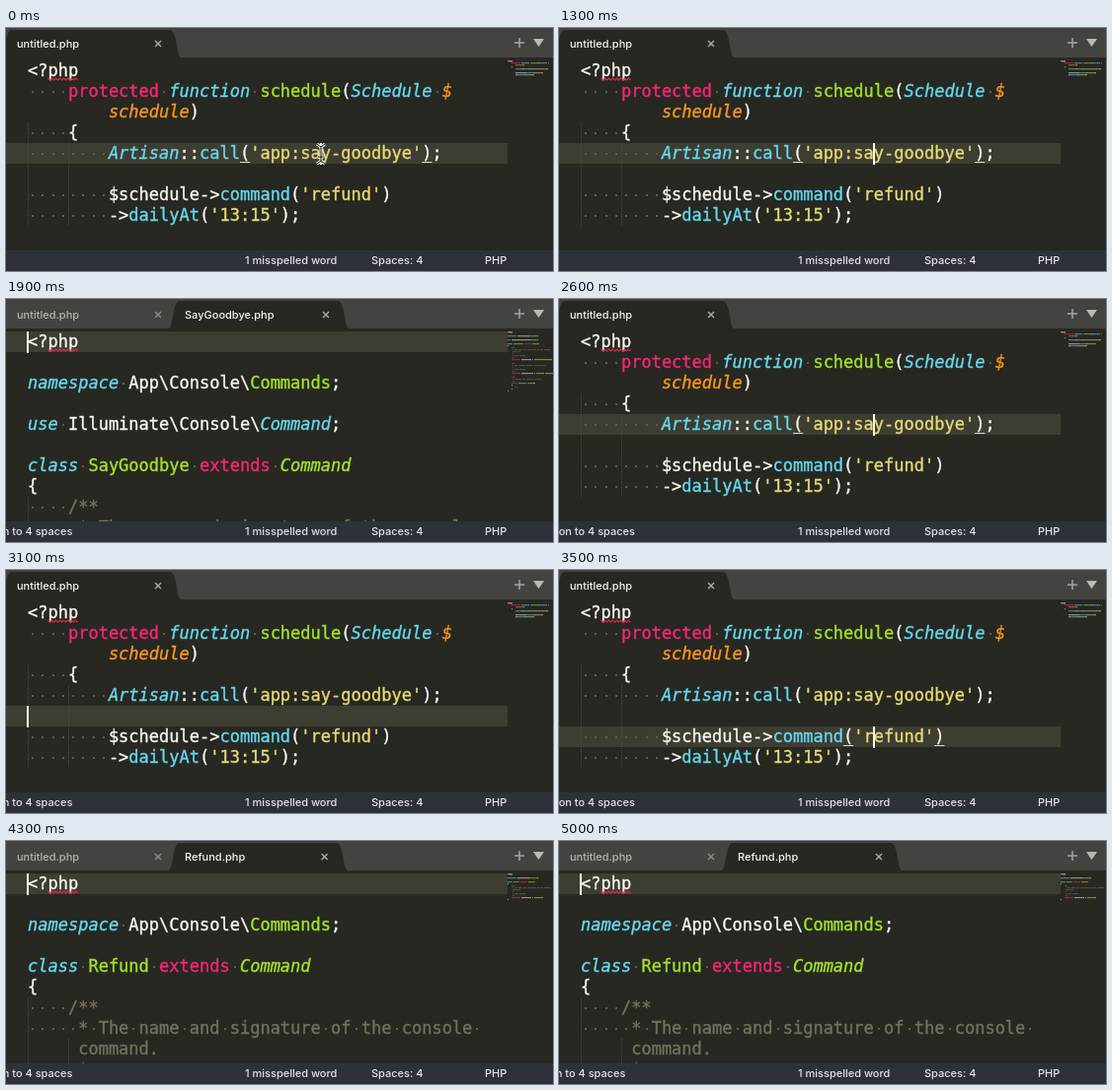
Write an HTML page with a canvas that moves like this. It is 554 px wide and 247 px high and loops after 5.1 s.

```html
<!DOCTYPE html>
<html lang="en">
<head>
<meta charset="utf-8">
<title>Editor: jump to command class</title>
<style>
html, body { margin: 0; width: 100%; height: 100%; overflow: hidden; background: #272822; }
canvas { display: block; width: 554px; height: 247px; }
</style>
</head>
<body>
<canvas id="stage" width="554" height="247"></canvas>
<script>
const ctx = document.getElementById('stage').getContext('2d');
const LOOP = 5100, STEP = 100;
const LEFT = 22, TOP = 33, ROW = 21, SIZE = 17, STATUS_Y = 226, MAP_X = 508;
const MONO = '"DejaVu Sans Mono", monospace', UI = 'Inter, sans-serif';
const BG = '#272822', LINE = '#3e3d32';
const COLORS = { w: '#f8f8f2', p: '#f92672', c: '#66d9ef', g: '#a6e22e', o: '#fd971f', y: '#e6db74', k: '#75715e' };

// Each row is split by "|"; a segment starts with its colour key, upper case meaning italic.
// "_" marks the blank indent of a wrapped row.
const parse = row => row ? row.split('|').map(s => ({ key: s[0], text: s.slice(1) })) : [];

const header = ['w<?php', '', 'Cnamespace|w App\\Console\\|gCommands|w;', ''];
const docTop = ['k    /**', 'k     * The name and signature of the console ', '_     |kcommand.',
  'k     *', 'k     * @var string', 'k     */'];

const files = {
  untitled: {
    rows: [
      'w<?php',
      'w    |pprotected|w |Cfunction|w |gschedule|w(|CSchedule|w |O$',
      '_        |Oschedule|w)',
      'w    {',
      'w        |CArtisan|w::|ccall|w(|y\'app:say-goodbye\'|w);',
      '',
      'w        $schedule->|ccommand|w(|y\'refund\'|w)',
      'w        ->|cdailyAt|w(|y\'13:15\'|w);'
    ],
    guides: [[0, 3, 8], [4, 4, 8]]
  },
  goodbye: {
    label: 'SayGoodbye.php',
    rows: [...header, 'Cuse|w Illuminate\\Console\\|CCommand|w;', '',
      'Cclass|w |gSayGoodbye|w |pextends|w |GCommand', 'w{', ...docTop,
      'w    |pprotected|w $signature = |y\'app:say-goodbye\'|w;', '',
      'k    /**', 'k     * The console command description.', 'k     *', 'k     * @var string', 'k     */',
      'w    |pprotected|w $description = |y\'Command description\'|w;', '',
      'k    /**', 'k     * Execute the console command.', 'k     */',
      'w    |ppublic|w |Cfunction|w |ghandle|w()', 'w    {', 'k        //', 'w    }', 'w}'],
    guides: [[0, 8, 10]]
  },
  refund: {
    label: 'Refund.php',
    rows: [...header, 'Cclass|w |gRefund|w |pextends|w |GCommand', 'w{', ...docTop,
      'w    |pprotected|w $signature = |y\'refund\'|w;', 'w}'],
    guides: [[0, 6, 10], [4, 8, 10]]
  }
};
for (const file of Object.values(files)) file.rows = file.rows.map(parse);

// Caret stops: start time, file, row, column, matching bracket columns.
const stops = [
  { at: 0, file: 'untitled', row: 4, col: 29, brackets: [21, 39] },
  { at: 1600, file: 'goodbye', row: 0, col: 0 },
  { at: 2500, file: 'untitled', row: 4, col: 29, brackets: [21, 39] },
  { at: 3000, file: 'untitled', row: 5, col: 0 },
  { at: 3300, file: 'untitled', row: 6, col: 29, brackets: [26, 35] },
  { at: 4200, file: 'refund', row: 0, col: 0 }
];

ctx.font = `${SIZE}px ${MONO}`;
const CHAR = ctx.measureText('0').width;
const colX = col => LEFT + col * CHAR;
const rowY = row => TOP + row * ROW;
const clamp = v => Math.max(0, Math.min(1, v));
const ease = v => 1 - (1 - clamp(v)) ** 3;

function rect(x, y, w, h, color) {
  ctx.fillStyle = color;
  ctx.fillRect(x, y, w, h);
}

function path(points, color, width) {
  ctx.beginPath();
  points.forEach(([x, y], i) => i ? ctx.lineTo(x, y) : ctx.moveTo(x, y));
  ctx.strokeStyle = color;
  ctx.lineWidth = width;
  ctx.stroke();
}

function label(text, x, y, color, align = 'left') {
  ctx.font = `500 11px ${UI}`;
  ctx.textAlign = align;
  ctx.fillStyle = color;
  ctx.fillText(text, x, y);
  ctx.textAlign = 'left';
}

function drawRow(segments, row) {
  const base = rowY(row) + 16;
  let col = 0;
  for (const { key, text } of segments) {
    const italic = key !== key.toLowerCase();
    ctx.font = `${italic ? 'italic ' : ''}${SIZE}px ${MONO}`;
    const color = COLORS[key.toLowerCase()];
    if (color) {
      ctx.fillStyle = ctx.strokeStyle = color;
      ctx.lineWidth = 0.35;
      ctx.fillText(text, colX(col), base);
      ctx.strokeText(text, colX(col), base);
      [...text].forEach((c, i) => {
        if (c === ' ') rect(Math.round(colX(col + i + 0.5)) - 1, base - 6, 2, 2, '#5c5b50');
      });
    }
    col += text.length;
  }
}

function drawSquiggle() {
  const points = [];
  for (let x = colX(2); x <= colX(5); x += 2) points.push([x, 51 + (points.length % 2) * 2]);
  path(points, '#e0284f', 1.2);
}

function drawMinimap(rows) {
  rows.forEach((segments, row) => {
    let x = MAP_X;
    for (const { key, text } of segments) {
      ctx.fillStyle = COLORS[key.toLowerCase()] || BG;
      ctx.globalAlpha = 0.5;
      [...text].forEach((c, i) => {
        if (c !== ' ') ctx.fillRect(x + i, TOP + row * 2, 1, 1.2);
      });
      x += text.length;
    }
  });
  ctx.globalAlpha = 1;
  rect(MAP_X + 2, TOP + 1, 3, 1, '#c02a52');
}

function blink(elapsed) {
  const t = elapsed % 1000;
  return t < 625 ? 1 - clamp((t - 450) / 150) : clamp((t - 650) / 150);
}

function drawCode(file, stop, t) {
  ctx.save();
  ctx.beginPath();
  ctx.rect(0, 30, 554, STATUS_Y - 30);
  ctx.clip();
  rect(0, rowY(stop.row), MAP_X, ROW, LINE);
  for (const [col, from, to] of file.guides)
    for (let y = rowY(from); y < rowY(to); y += 2) rect(Math.round(colX(col)), y, 1, 1, '#4a4a41');
  file.rows.slice(0, 10).forEach(drawRow);
  drawSquiggle();
  for (const col of stop.brackets || [])
    rect(colX(col), rowY(stop.row) + 19, CHAR, 1, '#d8d8d0');
  ctx.globalAlpha = blink(t - stop.at);
  rect(Math.round(colX(stop.col)) - 1, rowY(stop.row), 2, 22, '#f8f8f0');
  ctx.globalAlpha = 1;
  drawMinimap(file.rows);
  ctx.restore();
}

function drawTab(x, width, text, active) {
  if (width < 8) return;
  const end = x + width;
  if (active) {
    ctx.beginPath();
    ctx.moveTo(x - 6, 30);
    ctx.bezierCurveTo(x, 30, x - 2, 2, x + 6, 2);
    ctx.lineTo(end - 6, 2);
    ctx.bezierCurveTo(end + 2, 2, end, 30, end + 6, 30);
    ctx.fillStyle = BG;
    ctx.fill();
  }
  ctx.save();
  ctx.beginPath();
  ctx.rect(x, 0, width, 30);
  ctx.clip();
  label(text, x + 11, 20, active ? '#f5f5f2' : '#b4b4ae');
  const cx = end - 18, cy = 16, color = active ? '#a9a9a4' : '#8b8b86';
  path([[cx - 3, cy - 3], [cx + 3, cy + 3]], color, 1.4);
  path([[cx + 3, cy - 3], [cx - 3, cy + 3]], color, 1.4);
  ctx.restore();
}

function drawTabs(stop, t) {
  rect(0, 0, 554, 30, '#434440');
  const file = files[stop.file];
  drawTab(0, 172, 'untitled.php', !file.label);
  if (file.label) drawTab(170, 172 * ease((t - stop.at + 60) / 200), file.label, true);
  path([[515, 15], [525, 15]], '#a5a5a0', 1.5);
  path([[520, 10], [520, 20]], '#a5a5a0', 1.5);
  ctx.beginPath();
  ctx.moveTo(534, 11);
  ctx.lineTo(545, 11);
  ctx.lineTo(539.5, 19);
  ctx.fillStyle = '#b9b9b4';
  ctx.fill();
}

function drawStatus(stop, t) {
  const color = '#e2e3e6';
  rect(0, STATUS_Y, 554, 247 - STATUS_Y, '#2e3138');
  // The column number's second digit pushes the message to the right.
  if (t >= stops[1].at)
    label('Detect Indentation: Setting indentation to 4 spaces', stop.col > 9 ? 77 : 67.5, 240, color, 'right');
  label('1 misspelled word', 242, 240, color);
  label('Spaces: 4', 370, 240, color);
  label('PHP', 485, 240, color);
}

function drawPointer(t) {
  if (t >= 1100) return;
  const first = ease(t / 600), second = clamp((t - 600) / 450) ** 1.4;
  const x = Math.round(319 + 91 * first + 152 * second);
  const y = Math.round(128 + 60 * first + 66 * second);
  for (const [color, width] of [['#f4f4f4', 3], ['#111', 1]]) {
    path([[x - 4, y - 10], [x, y - 7], [x + 4, y - 10]], color, width);
    path([[x, y - 7], [x, y + 7]], color, width);
    path([[x - 4, y + 10], [x, y + 7], [x + 4, y + 10]], color, width);
    path([[x - 3, y + 3], [x + 3, y + 3]], color, width);
  }
}

function draw() {
  const t = Math.floor(performance.now() % LOOP / STEP) * STEP;
  const stop = stops.filter(s => s.at <= t).pop();
  rect(0, 0, 554, 247, BG);
  drawCode(files[stop.file], stop, t);
  drawTabs(stop, t);
  drawStatus(stop, t);
  drawPointer(t);
  requestAnimationFrame(draw);
}
draw();
</script>
</body>
</html>
```
